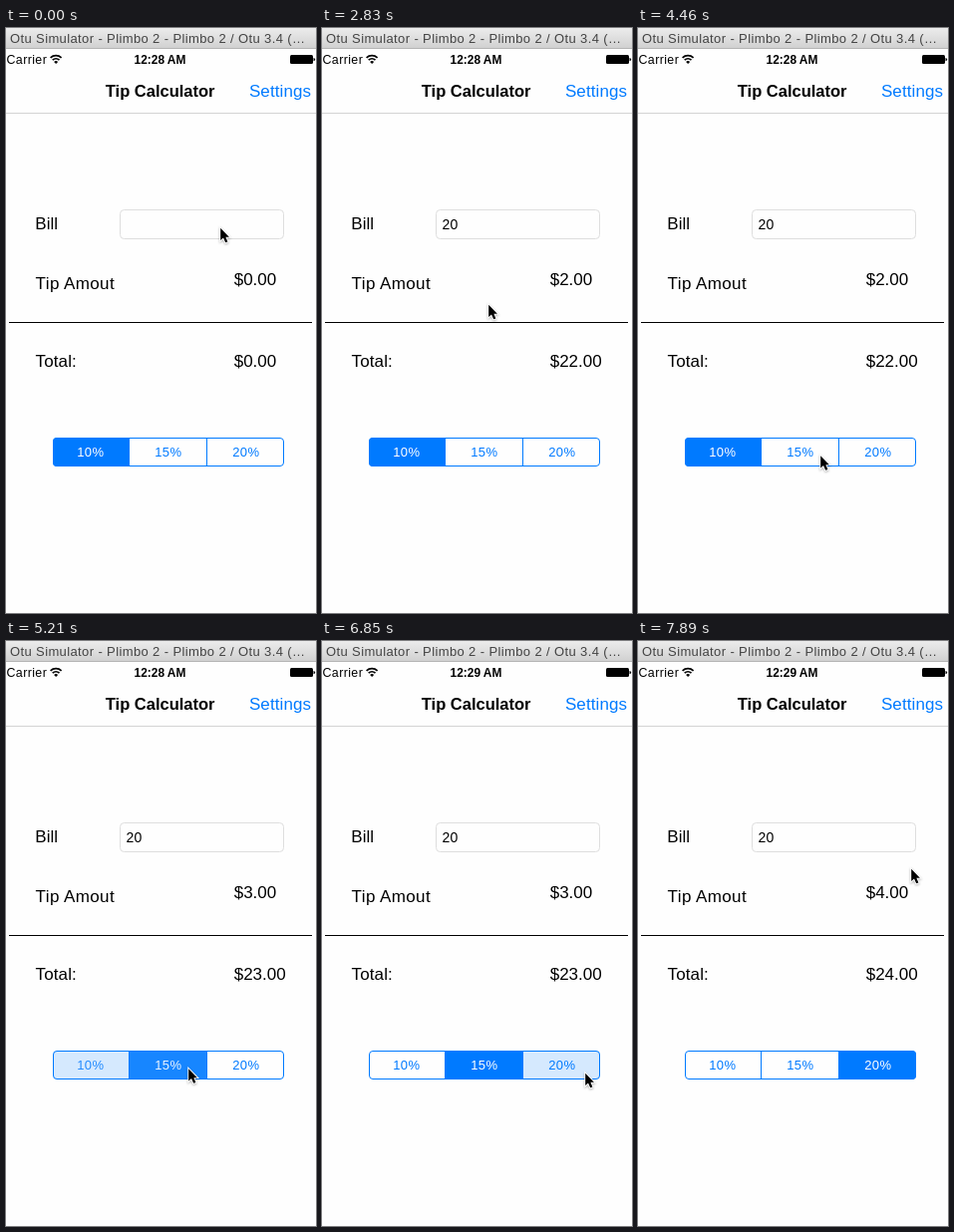
An HTML page for the animation above (8 s loop, 311x587 px).

```html
<!DOCTYPE html>
<html lang="en">
<head>
<meta charset="utf-8">
<title>Tip Calculator</title>
<style>
  html, body { margin: 0; width: 100%; height: 100%; overflow: hidden; background: #fefefe; }
  svg { display: block; width: 311px; height: 587px; }
  text { font: 17px "Liberation Sans", Arial, sans-serif; fill: #000; white-space: pre; }
  .window { font-size: 13px; letter-spacing: .38px; fill: #434343; }
  .carrier { font-size: 12.4px; letter-spacing: .4px; }
  .clock { font-size: 11.9px; font-weight: bold; }
  .title { font-size: 16.5px; font-weight: bold; }
  .bill { font-size: 14px; }
  .option { font-size: 13px; letter-spacing: .4px; text-anchor: middle; }
  .link { fill: #007aff; }
  #cursor { filter: drop-shadow(0 1px 1px rgba(0, 0, 0, .3)); }
</style>
</head>
<body>
<svg viewBox="0 0 311 587">
  <defs>
    <linearGradient id="chrome" x2="0" y2="1">
      <stop stop-color="#ececec"/><stop offset="1" stop-color="#d1d1d1"/>
    </linearGradient>
    <clipPath id="pill"><rect x="47" y="411" width="232" height="29" rx="4"/></clipPath>
  </defs>
  <rect width="311" height="587" fill="#fefefe"/>
  <rect width="311" height="20" fill="url(#chrome)"/>
  <rect y="20" width="311" height="1" fill="#b4b4b4"/>
  <text class="window" x="4" y="15">Otu Simulator - Plimbo 2 - Plimbo 2 / Otu 3.4 (…</text>

  <text class="carrier" x="0.5" y="35.5">Carrier</text>
  <g fill="none" stroke="#000" stroke-width="1.7">
    <path d="M44.6 29.8a8 8 0 0 1 11 0M46.7 32.1a5 5 0 0 1 6.8 0"/>
    <path d="M50.1 36l-2-2.1a2.9 2.9 0 0 1 4 0z" fill="#000" stroke="none"/>
  </g>
  <text class="clock" id="clock" x="128.6" y="35.5"></text>
  <rect x="285" y="27" width="23" height="9" rx="1.5"/>
  <path d="M308.5 30a1.6 1.6 0 0 1 0 3.2z"/>

  <text class="title" x="99.8" y="69">Tip Calculator</text>
  <text class="link" x="243.9" y="69" letter-spacing=".1">Settings</text>
  <rect y="85" width="311" height="1" fill="#d4d4d4"/>

  <text x="29.3" y="202">Bill</text>
  <rect x="114.5" y="182.5" width="164" height="29" rx="4" fill="#fefefe" stroke="#dedede"/>
  <text class="bill" id="bill" x="120.6" y="202"></text>
  <rect id="caret" y="187" width="2" height="19" fill="#3f66e0"/>

  <text x="29.6" y="262" letter-spacing=".4">Tip Amout</text>
  <text id="tip" x="228.7" y="258"></text>
  <rect x="3" y="295" width="304" height="1"/>
  <text x="29.6" y="340" letter-spacing=".1">Total:</text>
  <text id="total" x="228.7" y="340"></text>

  <g id="options" clip-path="url(#pill)"></g>
  <path d="M123.5 411v29M201.5 411v29" stroke="#007aff"/>
  <rect x="47.5" y="411.5" width="231" height="28" rx="3.5" fill="none" stroke="#007aff"/>

  <path id="cursor" d="M1.7 2.2V14.6L4.5 12L6.7 16.8L8.9 15.9L6.9 11.2H10.4Z" stroke="#fff" paint-order="stroke" stroke-width="1.8"/>
</svg>
<script>
  const LOOP = 8000;
  const STEP = 148.8; // the screen refreshes at this interval, in ms
  const el = id => document.getElementById(id);

  // All times below count refresh steps.
  const focusAt = 3, typeAt = [9, 12], doneAt = 19, minuteAt = 37;
  const taps = [{ at: 34, option: 1 }, { at: 46, option: 2 }];
  const moves = [
    { from: 1, to: 4, x: 205.5, y: 196.5 },
    { from: 14, to: 18, x: 165.5, y: 275.5 },
    { from: 24, to: 30, x: 181.5, y: 427 },
    { from: 39, to: 43, x: 262.5, y: 431.5 },
    { from: 50, to: 53, x: 272.5, y: 226.5 }
  ];

  const add = (tag, attrs) => {
    const node = document.createElementNS('http://www.w3.org/2000/svg', tag);
    for (const key in attrs) node.setAttribute(key, attrs[key]);
    return el('options').appendChild(node);
  };
  const options = [0, 1, 2].map(i => {
    const x = 46 + 78 * i;
    const fill = add('rect', { x, y: 411, width: 78, height: 29, fill: '#007aff' });
    const label = add('text', { x: x + 38.8, y: 430, class: 'option' });
    label.textContent = 10 + 5 * i + '%';
    return { fill, label };
  });

  const money = n => '$' + n.toFixed(2);

  function pointer(step) {
    let x = 213.5, y = 198.5;
    for (const move of moves) {
      const p = Math.min(1, Math.max(0, (step - move.from) / (move.to - move.from)));
      const k = p * p * (3 - 2 * p);
      x += (move.x - x) * k;
      y += (move.y - y) * k;
    }
    return `translate(${x} ${y})`;
  }

  // The caret stays on for three steps after input, then fades.
  function caret(step) {
    const last = [focusAt, ...typeAt].filter(at => at <= step).pop();
    return last === undefined ? 0 : Math.min(1, Math.max(0, 2 - (step - last) / 2));
  }

  // A tap tints the new option, cross-fades for one step, then settles.
  function paintOptions(step) {
    const tap = taps.filter(({ at }) => at <= step).pop();
    const age = tap ? step - tap.at : 2;
    const chosen = tap ? tap.option : 0;
    options.forEach(({ fill, label }, i) => {
      let shade = i === chosen ? [.16, .91, 1][Math.min(age, 2)] : 0;
      if (i === chosen - 1) shade = [1, .16, 0][Math.min(age, 2)];
      const on = shade > .5;
      fill.setAttribute('opacity', shade);
      label.style.fill = on ? '#fff' : '#007aff';
      label.style.opacity = on ? shade : age === 1 ? 1 - shade : 1;
    });
  }

  function draw(now) {
    const step = Math.floor((now + 10) / STEP);
    const bill = '20'.slice(0, typeAt.filter(at => at <= step).length);
    const amount = step < doneAt ? 0 : 20;
    const tip = amount * (.1 + .05 * taps.filter(({ at }) => at < step).length);

    el('clock').textContent = step < minuteAt ? '12:28 AM' : '12:29 AM';
    el('bill').textContent = bill;
    el('tip').textContent = money(tip);
    el('total').textContent = money(amount + tip);
    el('caret').setAttribute('x', 120.8 + bill.length * 7.7);
    el('caret').setAttribute('opacity', caret(step));
    el('cursor').setAttribute('transform', pointer(step));
    paintOptions(step);
  }

  const begin = performance.now();
  function frame() {
    draw((performance.now() - begin) % LOOP);
    requestAnimationFrame(frame);
  }
  frame();
</script>
</body>
</html>
```
